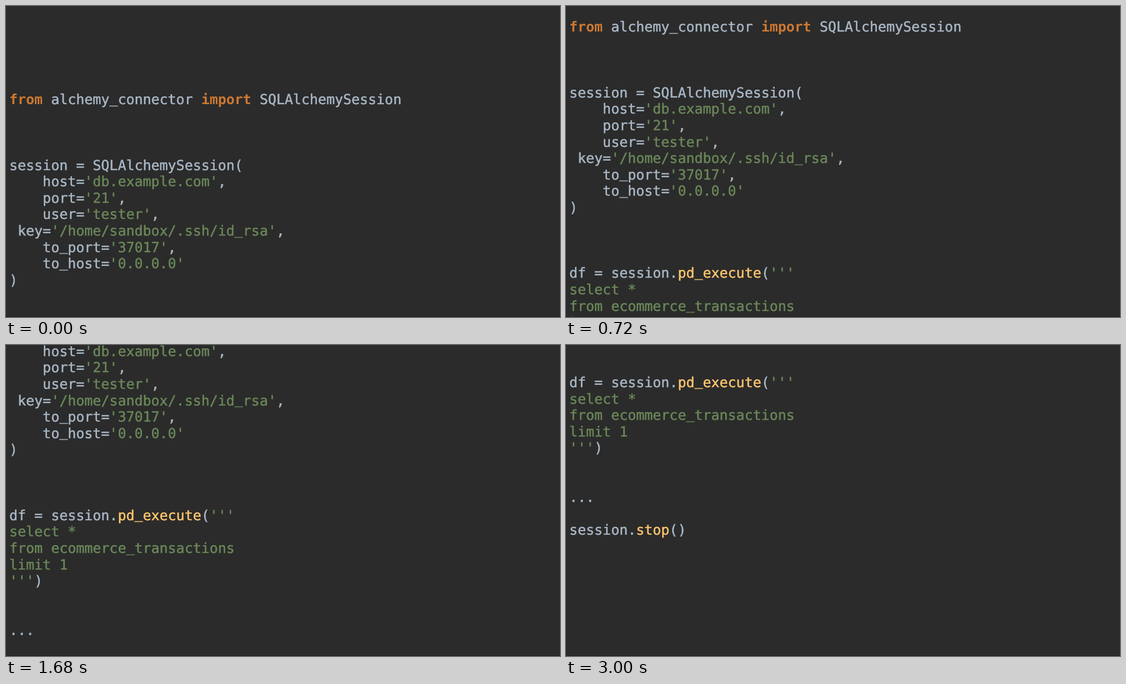
An HTML page with a canvas for the animation above (3120 ms loop, 998 by 561 pixels).

```html
<!DOCTYPE html>
<html lang="en">
<head>
<meta charset="utf-8">
<title>Scrolling code</title>
<style>
  html, body { margin: 0; width: 100%; height: 100%; overflow: hidden; background: #2b2b2b; }
  canvas { display: block; }
</style>
</head>
<body>
<canvas id="stage" width="998" height="561"></canvas>
<script>
const ctx = document.getElementById('stage').getContext('2d');
ctx.textRendering = 'geometricPrecision';
ctx.lineJoin = 'round';
ctx.lineWidth = 0.5;

const LOOP = 3120, STEP = 120, SHIFT = 21.81;
const LEFT = 6, TOP = 177.2, LINE = 29.6, CHAR = 15.03;
const UNDERSCORE_LIFT = 2.5;
const FONT = '25px "DejaVu Sans Mono", monospace';

const COLORS = { text: '#a9b7c6', keyword: '#cc7832', string: '#6a8759', call: '#ffc66d' };
const text = s => [s, 'text'];
const keyword = s => [s, 'keyword'];
const string = s => [s, 'string'];
const call = s => [s, 'call'];
const argument = (name, value, end = ',') => [text(name + '='), string(`'${value}'`), text(end)];

const code = [
  [keyword('from'), text(' alchemy_connector '), keyword('import'), text(' SQLAlchemySession')],
  [], [], [],
  [text('session = SQLAlchemySession(')],
  argument('    host', 'db.example.com'),
  argument('    port', '21'),
  argument('    user', 'tester'),
  argument(' key', '/home/sandbox/.ssh/id_rsa'),
  argument('    to_port', '37017'),
  argument('    to_host', '0.0.0.0', ''),
  [text(')')],
  [], [], [],
  [text('df = session.'), call('pd_execute'), text('('), string("'''")],
  [string('select *')],
  [string('from ecommerce_transactions')],
  [string('limit 1')],
  [string("'''"), text(')')],
  [], [],
  [text('...')],
  [],
  [text('session.'), call('stop'), text('()')]
];

// A thin outline gives the glyphs a slightly heavier weight.
function drawGlyph(glyph, x, y, outlined) {
  ctx.fillText(glyph, x, y);
  if (outlined) ctx.strokeText(glyph, x, y);
}

function drawLine(tokens, y) {
  let column = 0;
  for (const [content, kind] of tokens) {
    const bold = kind === 'keyword';
    ctx.font = (bold ? 'bold ' : '') + FONT;
    ctx.fillStyle = ctx.strokeStyle = COLORS[kind];
    for (const glyph of content) {
      const lift = glyph === '_' ? UNDERSCORE_LIFT : 0;
      drawGlyph(glyph, LEFT + column * CHAR, y - lift, !bold);
      column++;
    }
  }
}

function draw(now) {
  const step = Math.floor((now % LOOP) / STEP);
  ctx.fillStyle = '#2b2b2b';
  ctx.fillRect(0, 0, 998, 561);
  code.forEach((tokens, i) => drawLine(tokens, TOP + i * LINE - step * SHIFT));
  ctx.fillStyle = '#1c1c1c';
  ctx.fillRect(0, 560, 998, 1);
}

function tick() {
  draw(performance.now());
  requestAnimationFrame(tick);
}
tick();
</script>
</body>
</html>
```
